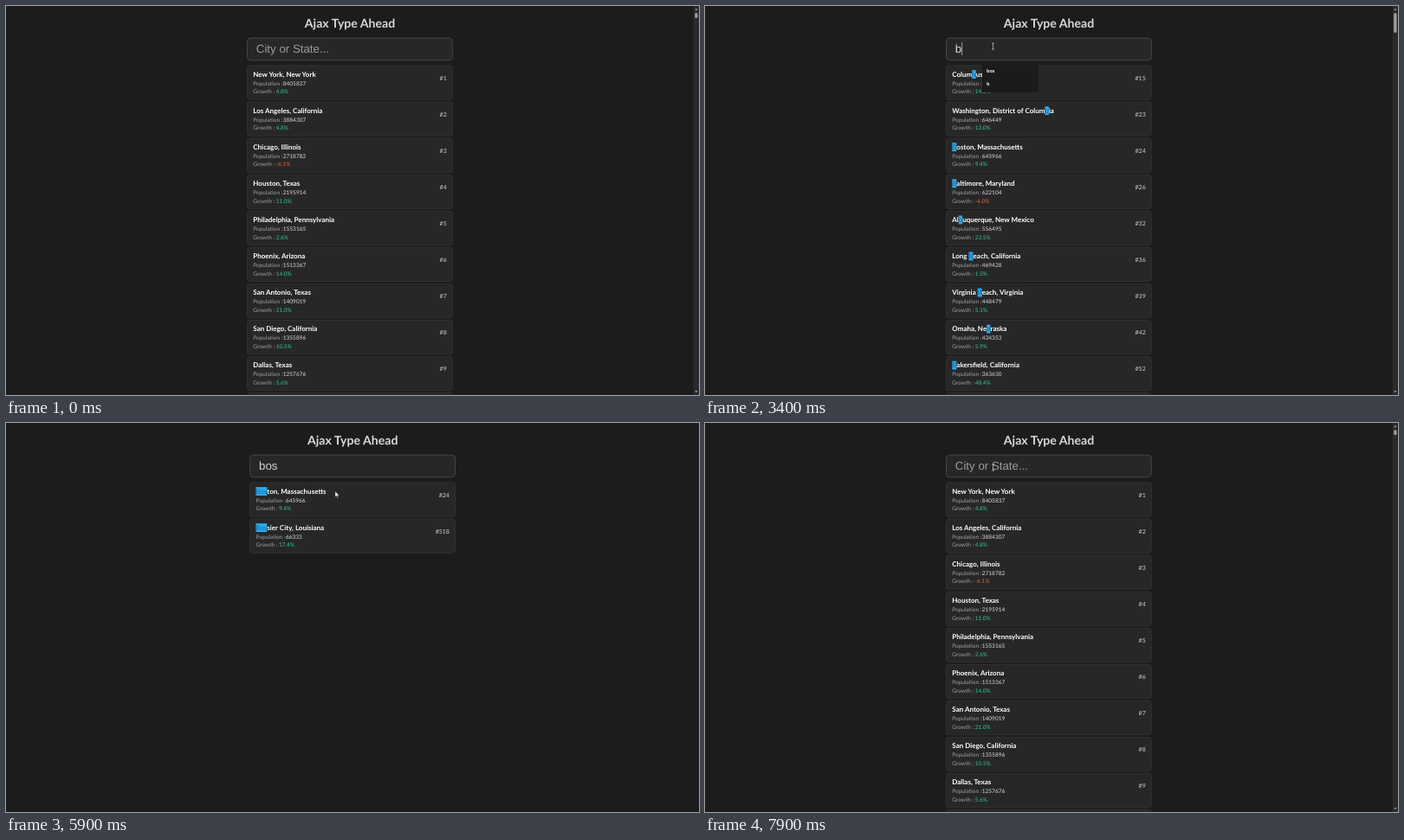
These frames come from a looping animation (800 px wide and 450 px high, 8000 ms). An HTML page with a canvas:

```html
<!DOCTYPE html>
<html lang="en">
<head>
<meta charset="utf-8">
<title>Ajax Type Ahead</title>
<style>
  html, body { margin: 0; width: 100%; height: 100%; overflow: hidden; background: #1c1c1c; }
  canvas { display: block; width: 800px; height: 450px; }
</style>
</head>
<body>
<canvas id="stage"></canvas>
<script>
const W = 800, H = 450, LOOP = 8000, STEP = 100;
const BODY = 'Lato, sans-serif';
const FIELD = '"Liberation Sans", Arial, sans-serif';
const PITCH = 42.08;

const canvas = document.getElementById('stage');
const ctx = canvas.getContext('2d');
const ratio = window.devicePixelRatio || 1;
canvas.width = W * ratio;
canvas.height = H * ratio;

// rank | place | population | growth
const parse = rows => rows.trim().split('\n').map(row => row.trim().split('|'));
const results = {
  '': parse(`
    1|New York, New York|8405837|4.8%
    2|Los Angeles, California|3884307|4.8%
    3|Chicago, Illinois|2718782|-6.1%
    4|Houston, Texas|2195914|11.0%
    5|Philadelphia, Pennsylvania|1553165|2.6%
    6|Phoenix, Arizona|1513367|14.0%
    7|San Antonio, Texas|1409019|21.0%
    8|San Diego, California|1355896|10.5%
    9|Dallas, Texas|1257676|5.6%`),
  b: parse(`
    15|Columbus, Ohio|822553|14.8%
    23|Washington, District of Columbia|646449|13.0%
    24|Boston, Massachusetts|645966|9.4%
    26|Baltimore, Maryland|622104|-4.0%
    32|Albuquerque, New Mexico|556495|23.5%
    36|Long Beach, California|469428|1.5%
    39|Virginia Beach, Virginia|448479|5.1%
    42|Omaha, Nebraska|434353|5.9%
    52|Bakersfield, California|363630|48.4%`),
  bo: parse(`
    24|Boston, Massachusetts|645966|9.4%
    68|Greensboro, North Carolina|279639|22.3%
    84|Lubbock, Texas|239538|19.6%
    98|Boise City, Idaho|214237|9.5%
    228|Murfreesboro, Tennessee|117044|65.1%
    229|Ann Arbor, Michigan|117025|2.0%
    279|Boulder, Colorado|103166|9.0%
    303|Hillsboro, Oregon|97368|36.4%
    311|Dearborn, Michigan|95884|-2.0%`),
  bos: parse(`
    24|Boston, Massachusetts|645966|9.4%
    518|Bossier City, Louisiana|66333|17.4%`)
};
const thumbEnd = { '': 14, b: 31, bo: 164 };
const history = { b: ['bos', 'b'], bo: ['bos'] };

const typing = [[0, ''], [3300, 'b'], [3600, 'bo'], [3900, 'bos'], [7100, 'bo'], [7300, 'b'], [7400, '']];
const caretOn = [[1900, 2400], [2950, 4400], [6300, 6900], [7300, 7900]];
const pressed = [[1900, 2000], [6300, 6400]];

// time, x, y of the pointer
const path = [
  [700, 782, 281], [800, 690, 232], [900, 560, 172], [1000, 420, 112], [1100, 320, 70],
  [1200, 276, 51], [1300, 297, 49], [1400, 324, 47], [1500, 332.5, 46.5],
  [4300, 332.5, 46.5], [4400, 340, 52], [4700, 490, 130], [5000, 609.8, 197],
  [5500, 609.8, 197], [5600, 596, 188], [5800, 460, 110], [6000, 300, 48],
  [6100, 275, 46], [6200, 318, 50], [6300, 332.5, 51.5], [8000, 332.5, 51.5]
];

const within = (spans, t) => spans.some(([a, b]) => t >= a && t < b);
const queryAt = t => typing.filter(([at]) => at <= t).pop()[1];

function pointerAt(t) {
  if (t < path[0][0]) return null;
  const i = path.findIndex(p => p[0] > t);
  const [t0, x0, y0] = path[i - 1], [t1, x1, y1] = path[i];
  const k = (t - t0) / (t1 - t0);
  return [x0 + (x1 - x0) * k, y0 + (y1 - y0) * k];
}

function text(str, x, y, font, color, align = 'left') {
  ctx.font = font;
  ctx.fillStyle = color;
  ctx.textAlign = align;
  ctx.fillText(str, x, y);
  return ctx.measureText(str).width;
}

function box(x, y, w, h, r, fill, stroke, line = 1) {
  ctx.beginPath();
  ctx.roundRect(x, y, w, h, r);
  ctx.fillStyle = fill;
  ctx.fill();
  if (stroke) {
    ctx.strokeStyle = stroke;
    ctx.lineWidth = line;
    ctx.stroke();
  }
}

function polygon(points, fill) {
  ctx.beginPath();
  points.forEach(([x, y]) => ctx.lineTo(x, y));
  ctx.closePath();
  ctx.fillStyle = fill;
  ctx.fill();
}

function placeName(name, query, x, y) {
  const bold = `700 8px ${BODY}`;
  const at = query ? name.toLowerCase().indexOf(query) : -1;
  if (at < 0) return text(name, x, y, bold, '#fff');
  x += text(name.slice(0, at), x, y, bold, '#fff');
  const hit = name.slice(at, at + query.length);
  const font = `400 7.8px ${BODY}`;
  ctx.font = font;
  const w = ctx.measureText(hit).width;
  ctx.fillStyle = '#2ba9ec';
  ctx.fillRect(x, y - 7.7, w, 9.9);
  text(hit, x, y, font, '#1b6ca6');
  text(name.slice(at + query.length), x + w, y, bold, '#fff');
}

function card(y, row, query) {
  box(278.5, y, 236.8, 39.3, 3, '#272728', '#353537', 0.8);
  if (!row) return;
  const [rank, name, population, growth] = row;
  const small = `400 6.5px ${BODY}`;
  placeName(name, query, 285.3, y + 12.9);
  text('Population :', 285.3, y + 22.8, small, '#a0a0a0');
  text(population, 319.8, y + 22.8, small, '#dedede');
  text('Growth :', 285.3, y + 32.4, small, '#a0a0a0');
  text(growth, 311.7, y + 32.4, small, growth[0] === '-' ? '#dd6644' : '#2fcf8b');
  text('#' + rank, 508.7, y + 16.8, `400 7px ${BODY}`, '#cfcfcf', 'right');
}

function field(query, caret, active) {
  box(278.5, 37, 236.8, 25.8, 4, '#272728', active ? '#2a6c9e' : '#444446', 1);
  const font = `13.3px ${FIELD}`;
  const w = text(query || 'City or State...', 288.8, 54.4, font, query ? '#d6d6d6' : '#9b9b9b');
  if (caret) {
    ctx.fillStyle = '#d0d0d0';
    ctx.fillRect(289 + (query ? w : 0), 42, 0.7, 15);
  }
}

function scrollbar(end) {
  ctx.fillStyle = '#2a2a2a';
  ctx.fillRect(793.6, 0, 6.4, H);
  box(795.1, 8, 3.4, end - 8, 1.7, '#9c9c9c');
  polygon([[795.3, 5], [796.8, 2.6], [798.3, 5]], '#9c9c9c');
  polygon([[795.3, 445], [796.8, 447.4], [798.3, 445]], '#9c9c9c');
}

function suggestions(list, x) {
  box(x, 68, 65, 2 + list.length * 15, [0, 0, 2, 2], '#1b1b1c');
  list.forEach((word, i) =>
    text(word, x + 5, 77.4 + i * 15, '700 5.4px "Open Sans", sans-serif', '#eee'));
}

function pointer([x, y], overField) {
  if (overField) {
    ctx.strokeStyle = '#c8c8c8';
    ctx.lineWidth = 0.7;
    ctx.beginPath();
    ctx.moveTo(x, y - 3.5);
    ctx.lineTo(x, y + 3.5);
    for (const dy of [-3.5, 3.5]) {
      ctx.moveTo(x - 1.5, y + dy);
      ctx.lineTo(x + 1.5, y + dy);
    }
    ctx.stroke();
    return;
  }
  const shape = [[0, 0], [0, 6.6], [1.5, 5.2], [2.5, 7.5], [3.5, 7.1], [2.5, 4.9], [4.6, 4.8]];
  polygon(shape.map(([dx, dy]) => [x + dx, y + dy]), '#fff');
  ctx.strokeStyle = '#111';
  ctx.lineWidth = 0.4;
  ctx.stroke();
}

function draw(t) {
  const query = queryAt(t);
  const rows = results[query];
  const scrolls = query !== 'bos';

  ctx.setTransform(ratio, 0, 0, ratio, 0, 0);
  ctx.textRendering = 'geometricPrecision';
  ctx.fillStyle = '#1c1c1c';
  ctx.fillRect(0, 0, W, H);

  // Content is recentred when the scrollbar goes away.
  ctx.save();
  ctx.translate(scrolls ? 0 : 3.2, 0);
  text('Ajax Type Ahead', 397, 24.7, `700 14.1px ${BODY}`, '#d8d8d8', 'center');
  field(query, within(caretOn, t), within(pressed, t));
  const count = scrolls ? 10 : rows.length;
  for (let i = 0; i < count; i++) card(68.9 + i * PITCH, rows[i], query);
  ctx.restore();

  if (scrolls) scrollbar(thumbEnd[query]);
  if (history[query]) suggestions(history[query], t < 6000 ? 320 : 323);

  const p = pointerAt(t);
  if (p) pointer(p, p[0] > 278 && p[0] < 516 && p[1] > 37 && p[1] < 63);
}

function tick() {
  const t = performance.now() % LOOP;
  draw(Math.floor(t / STEP) * STEP);
  requestAnimationFrame(tick);
}
tick();
</script>
</body>
</html>
```
